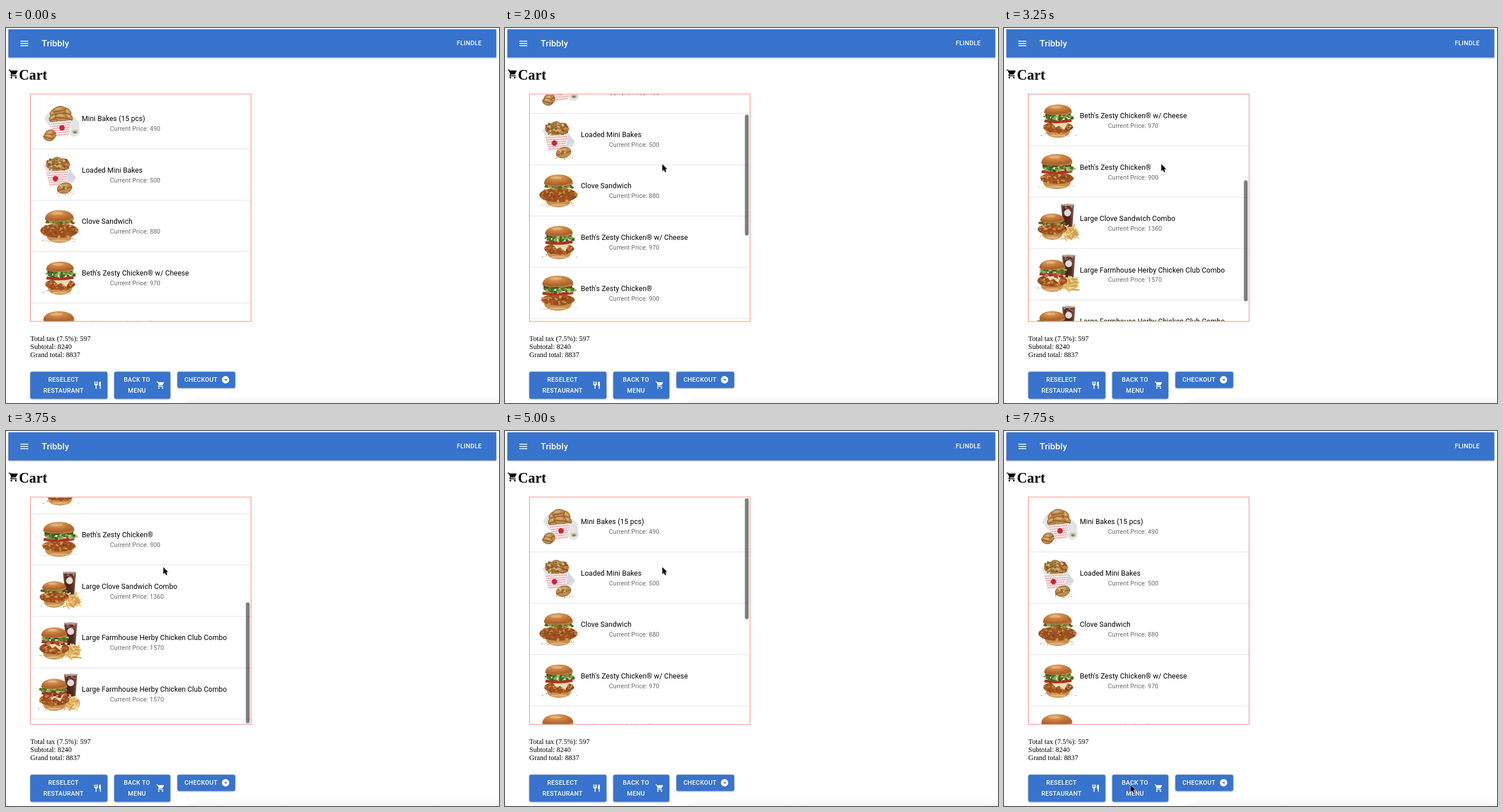
Recreate the animation shown at these times as an HTML page. Size 858 by 653 pixels, loop 8 s.

```html
<!DOCTYPE html>
<html lang="en">
<head>
<meta charset="utf-8">
<title>Cart</title>
<style>
@property --s { syntax: "<number>"; inherits: true; initial-value: 0; }
html, body { margin: 0; width: 100%; height: 100%; overflow: hidden; background: #fff; }
svg { display: block; }
text { font-family: Roboto, sans-serif; }
.raised { fill: #3873cd; filter: drop-shadow(0 1.4px 1.2px rgba(0,0,0,.3)) drop-shadow(0 .5px 1.5px rgba(0,0,0,.14)); }
.serif text { font: 12.3px "Liberation Serif", serif; }
.serif .h1 { font-size: 24.6px; font-weight: 700; }
.logo { font-size: 15.4px; font-weight: 500; letter-spacing: .0075em; fill: #fff; }
.cap { font-size: 10.75px; font-weight: 500; letter-spacing: .02857em; fill: #fff; }
.mid { text-anchor: middle; }
.name { font-size: 12.3px; letter-spacing: .00938em; }
.price { font-size: 10.75px; letter-spacing: .01071em; fill: #686868; }

#view { animation: scroll 8s step-end infinite; }
#list { transform: translateY(calc(var(--s) * -1px)); }
#thumb { transform: translateY(calc(var(--s) * .541px)); animation: thumb 8s step-end infinite; }
#cursor { animation: move 8s step-end infinite; }
@keyframes scroll {
  0% { --s: 0; } 21.875% { --s: 12; } 25% { --s: 62; } 28.125% { --s: 112; }
  31.25% { --s: 146.3; } 37.5% { --s: 212; } 40.625% { --s: 273.6; } 46.875% { --s: 335; }
  56.25% { --s: 241; } 59.375% { --s: 85; } 62.5%, 100% { --s: 0; }
}
@keyframes thumb {
  0% { opacity: 0; } 21.875% { opacity: 1; } 68.75% { opacity: .5; } 71.875%, 100% { opacity: 0; }
}
@keyframes move {
  0% { transform: translate(-40px, 0); }
  9.375% { transform: translate(512px, 133px); }
  12.5% { transform: translate(462px, 175px); }
  15.625% { transform: translate(274.5px, 237px); }
  18.75% { transform: translate(273.7px, 237px); }
  71.875% { transform: translate(274.5px, 239px); }
  75% { transform: translate(265.7px, 448px); }
  81.25% { transform: translate(239px, 558px); }
  84.375%, 100% { transform: translate(220.2px, 616.5px); }
}
</style>
</head>
<body>
<svg width="858" height="653" viewBox="0 0 858 653">
  <defs>
    <clipPath id="frame"><rect x="43" y="116" width="383" height="394.5"/></clipPath>
    <radialGradient id="bun" cx=".42" cy=".2" r=".85">
      <stop offset="0" stop-color="#dfa263"/><stop offset=".45" stop-color="#c47c3c"/>
      <stop offset=".8" stop-color="#a96029"/><stop offset="1" stop-color="#c98d4e"/>
    </radialGradient>
    <linearGradient id="cola">
      <stop offset="0" stop-color="#8d6a5f"/><stop offset=".25" stop-color="#4b2219"/>
      <stop offset=".7" stop-color="#54291f"/><stop offset="1" stop-color="#90695c"/>
    </linearGradient>
    <linearGradient id="haze" x2="0" y2="1">
      <stop offset="0" stop-color="#fff"/><stop offset="1" stop-color="#f6f6f6"/>
    </linearGradient>
    <path id="cart" d="M7 18c-1.1 0-2 .9-2 2s.9 2 2 2 2-.9 2-2-.9-2-2-2zM1 2v2h2l3.6 7.6-1.35 2.45c-.16.28-.25.61-.25.95 0 1.1.9 2 2 2h12v-2H7.42c-.14 0-.25-.11-.25-.25l.03-.12.9-1.63h7.45c.75 0 1.41-.41 1.75-1.03l3.58-6.49c.6-1-.1-1.48-.88-1.48H5.21l-.94-2H1zm16 16c-1.1 0-2 .9-2 2s.9 2 2 2 2-.9 2-2-.9-2-2-2z"/>
    <path id="arrow" d="M0 0V13.2L3 10.5 5 15.2 7.4 14.2 5.4 9.6H9.4Z"/>
  </defs>

  <path d="M310 653L350 638H858V653Z" fill="url(#haze)"/>
  <g class="raised">
    <rect x="4.2" y="2.3" width="849" height="48.9"/>
    <rect x="42.3" y="598.6" width="134.2" height="46.8" rx="3"/>
    <rect x="188.4" y="598.6" width="97.6" height="46.8" rx="3"/>
    <rect x="298.3" y="598.6" width="100.6" height="28.2" rx="3"/>
  </g>

  <path d="M25 23.1h13.8M25 26.9h13.8M25 30.7h13.8" stroke="#fff" stroke-width="1.5"/>
  <text class="logo" x="62" y="32">Tribbly</text>
  <text class="cap" x="784.5" y="30.3">FLINDLE</text>

  <use href="#cart" transform="translate(4 71) scale(.768)"/>
  <g class="serif">
    <text class="h1" x="22.6" y="89.5">Cart</text>
    <text x="42.3" y="545">Total tax (7.5%): 597</text>
    <text x="42.3" y="559">Subtotal: 8240</text>
    <text x="42.3" y="573">Grand total: 8837</text>
  </g>

  <g id="view" clip-path="url(#frame)">
    <g id="list"></g>
    <rect id="thumb" x="417.5" y="117.3" width="6.6" height="210.5" rx="3.3" fill="#000" fill-opacity=".51"/>
  </g>
  <rect x="42.5" y="115" width="384" height="396" fill="none" stroke="#f5857d"/>

  <g class="cap mid">
    <text x="100" y="616.3">RESELECT</text>
    <text x="100" y="635">RESTAURANT</text>
    <text x="228" y="616.3">BACK TO</text>
    <text x="228" y="635">MENU</text>
    <text x="339.3" y="616.3">CHECKOUT</text>
  </g>
  <path fill="#fff" transform="translate(151.6 614.2) scale(.64)" d="M11 9H9V2H7v7H5V2H3v7c0 2.12 1.66 3.84 3.75 3.97V22h2.5v-9.03C11.34 12.84 13 11.12 13 9V2h-2v7zm5-3v8h2.5v8H21V2c-2.76 0-5 2.24-5 4z"/>
  <use href="#cart" fill="#fff" transform="translate(261.5 614.2) scale(.64)"/>
  <circle cx="382.1" cy="612.5" r="6.4" fill="#fff"/>
  <path d="M379.5 611.9h2.6v-2l2.7 2.6-2.7 2.6v-2h-2.6z" fill="#3873cd"/>

  <g id="cursor">
    <g transform="scale(.92)">
      <use href="#arrow" x="1" y="1.4" opacity=".2"/>
      <use href="#arrow" stroke="#fff" stroke-width="1.4" paint-order="stroke"/>
    </g>
  </g>
</svg>
<script>
let seed = 7;
const rnd = () => (seed = seed * 16807 % 2147483647) / 2147483647;
const oval = (x, y, rx, ry, fill, more = '') =>
  `<ellipse cx="${x}" cy="${y}" rx="${rx}" ry="${ry}" fill="${fill}" ${more}/>`;
const path = (d, fill, more = '') => `<path d="${d}" fill="${fill}" ${more}/>`;

// Random spots inside an ellipse
function spots(n, cx, cy, rx, ry, size, colors) {
  let out = '';
  for (let i = 0; i < n; i++) {
    const a = rnd() * 6.283, d = Math.sqrt(rnd());
    const r = size * (.6 + rnd() * .6);
    out += oval((cx + Math.cos(a) * d * rx).toFixed(1), (cy + Math.sin(a) * d * ry).toFixed(1),
      r.toFixed(1), (r * .75).toFixed(1), colors[i % colors.length]);
  }
  return out;
}

const CRUST = ['#a4551f', '#c47a38', '#86431a', '#b4652a', '#d49a58'];
const GREEN = ['#587f2c', '#83a64c', '#3c621c', '#a5bf6c', '#4c7424'];
const PICKLE = ['#76822f', '#98a04a', '#5c6a22'];
const BACON = ['#b04430', '#cc7058', '#8f2f22'];

const crumbs = (cx, y, w) => spots(16, cx, y, w, 4, 1, ['#c98a4e', '#e0b98a', '#8fa65a']);

function burger({ cx, w, top, mid, base, bunH, pickle, tomato, cheese, bacon, wide = 1.15 }) {
  const h = w / 2, l = cx - h, r = cx + h, cy = (mid + base) / 2, b = top + bunH;
  let g = crumbs(cx, base + 5, h * 1.35);
  g += path(`M${l + 3} ${base - 4}H${r - 3}Q${r - 2} ${base + 9} ${cx} ${base + 10}Q${l + 2} ${base + 9} ${l + 3} ${base - 4}`, '#cb8f4c');
  g += oval(cx, base + 6, h * .6, 2, '#dfb07a');
  g += oval(cx, cy, h * wide - 1, (base - mid) / 2 + 1, '#98501f');
  g += spots(75, cx, cy, h * wide - 2, (base - mid) / 2 + 1, 2.3, CRUST);
  if (cheese) g += path(`M${cx - h * .5} ${mid}L${cx + h * .75} ${mid}L${cx + h * .45} ${mid + 13}L${cx + 2} ${mid + 6}L${cx - 4} ${mid + 9}Z`, '#eedcb2');
  if (tomato) g += path(`M${l + 1} ${mid - 5}Q${cx} ${mid - 2} ${r - 1} ${mid - 6}L${r} ${mid - 1}Q${cx} ${mid + 4} ${l} ${mid}Z`, '#b92c20');
  if (bacon) g += spots(18, cx, mid + 1, h, 4, 2.8, BACON);
  g += path(`M${l + 2} ${b - 4}H${r - 2}V${b + 3}H${l + 2}Z`, '#4f4a1c');
  g += pickle ? spots(22, cx, mid - 2, h * 1.04, 2.5, 2.8, PICKLE)
    : spots(48, cx, mid - 8, h * 1.1, 5, 3, GREEN);
  g += path(`M${l} ${b - 4}C${l} ${top + 4} ${cx - h * .5} ${top} ${cx} ${top}S${r} ${top + 4} ${r} ${b - 4}Q${r - 2} ${b} ${cx} ${b}T${l} ${b - 4}`, 'url(#bun)');
  return g + oval(cx - h * .15, top + bunH * .27, h * .4, bunH * .12, '#efc794', 'opacity=".5"');
}

const cup = (x, y) =>
  path(`M${x} ${y}H${x + 23}L${x + 20} ${y + 39}H${x + 4}Z`, 'url(#cola)') +
  oval(x + 11.5, y + 1, 11.5, 2, '#b9a198') +
  spots(14, x + 11.5, y + 6, 9, 4, 2, ['#8e6759', '#6a3f32', '#a98b80']) +
  `<circle cx="${x + 11.5}" cy="${y + 15}" r="6" fill="#e4dad7"/>`;

function fries() {
  let g = oval(61, 56, 13, 11, '#dfb264');
  for (let i = 0; i < 32; i++) {
    const x = 46 + rnd() * 25, y = 45 + rnd() * 21, a = rnd() * 3.14;
    const dx = Math.cos(a) * 7, dy = Math.sin(a) * 6;
    g += `<path d="M${x - dx * .8} ${y - dy}L${Math.min(77, x + dx)} ${y + dy}" stroke="${['#e6bd70', '#f3dba2', '#cf9a4c'][i % 3]}" stroke-width="2.2"/>`;
  }
  return g;
}

const taco = (x, y, rx, ry, turn) =>
  `<g transform="rotate(${turn} ${x} ${y})">` + oval(x, y, rx, ry, '#c08a4c', 'stroke="#8a5a2a" stroke-width=".9"') +
  path(`M${x - rx} ${y + 1}Q${x} ${y + ry * .2} ${x + rx} ${y + 1}`, 'none', 'stroke="#7d4a1d" stroke-width="1.2"') +
  oval(x - 1, y - ry * .45, rx * .55, ry * .25, '#d7ab6f') + '</g>';

// Carton with a dotted red print
const box = (d, lines, x, y) =>
  path(d, '#f8ecec') + path(lines, 'none', 'stroke="#d9747a" stroke-width="1.5" stroke-dasharray="1.6 1.3"') +
  `<circle cx="${x}" cy="${y}" r="4.8" fill="#cf2430"/>`;

const tacos = () =>
  path('M11 31L19 18 31 23 60 24 72 36 73 53 62 57 55 42 22 45Z', '#e1e3e7') +
  taco(31, 21, 10, 8, -35) + taco(49, 20, 10, 8, 35) + taco(38, 16, 11, 7, -10) +
  taco(29, 30, 9, 7, -20) + taco(52, 29, 9, 7, 20) + taco(41, 28, 11, 7, 4) +
  box('M22 37L59 33 55 60 28 64Z', 'M24 40L57 37M25 44L57 41M26 48L56 45M27 52L55 49M28 56L55 53M29 60L54 57', 42.5, 46.5) +
  taco(22, 59, 10, 9, -30) + taco(19, 63, 9, 6, 15) +
  oval(64, 54, 9, 8, '#e3e6e5') + oval(65, 53, 6, 4, '#c9d0a8') + oval(65, 54, 3, 2, '#7b8a55');

const loaded = () =>
  path('M10 23L20 15 55 27 67 44 62 52 48 55 20 42Z', '#e0e2e6') +
  taco(24, 20, 9, 8, -30) + taco(46, 20, 10, 9, 40) + taco(34, 15, 9, 7, 0) + taco(36, 27, 12, 8, 10) +
  spots(60, 35, 21, 21, 13, 2.1, ['#b87232', '#667f36', '#dcb878', '#8f5024', '#a9502c']) +
  box('M14 33L55 31 50 57 21 60Z', 'M16 36L53 34M17 40L53 38M18 44L52 42M19 48L51 46M20 52L51 50M21 56L50 54', 31, 45.5) +
  path('M55 31L67 44 52 51Z', '#d5d8dc') +
  crumbs(48, 70, 18) + taco(47, 62, 13, 9, -15) +
  spots(9, 44, 59, 9, 4, 1.9, ['#6f8b39', '#a55e2b', '#e3c788']);

const cluck = () => burger({ cx: 38, w: 50, top: 11, bunH: 20, mid: 35, base: 58, pickle: 1, wide: 1.37 });
const cheesy = () => burger({ cx: 39, w: 48, top: 11, bunH: 18, mid: 42, base: 59, tomato: 1, cheese: 1, wide: 1.12 });
const spicy = () => burger({ cx: 37, w: 54, top: 8, bunH: 20, mid: 41, base: 59, tomato: 1, wide: 1.1 });
const combo = () => cup(44, 6) + fries() +
  burger({ cx: 29, w: 42, top: 22, bunH: 16, mid: 41, base: 58, pickle: 1, wide: 1.26 });
const club = () => cup(46, 5) + fries() +
  burger({ cx: 29, w: 45, top: 13, bunH: 18, mid: 40, base: 59, tomato: 1, bacon: 1, cheese: 1, wide: 1.2 });

const items = [
  ['Mini Bakes (15 pcs)', 490, tacos],
  ['Loaded Mini Bakes', 500, loaded],
  ['Clove Sandwich', 880, cluck],
  ['Beth\'s Zesty Chicken® w/ Cheese', 970, cheesy],
  ['Beth\'s Zesty Chicken®', 900, spicy],
  ['Large Clove Sandwich Combo', 1360, combo],
  ['Large Farmhouse Herby Chicken Club Combo', 1570, club],
  ['Large Farmhouse Herby Chicken Club Combo', 1570, club]
];
const ROW = 89.45;
document.getElementById('list').innerHTML = items.map(([name, price, draw], i) =>
  `<g transform="translate(0 ${121.2 + i * ROW})">
    <g transform="translate(55 6.2)">${draw()}</g>
    <text class="name" x="132" y="41.3">${name}</text>
    <text class="price" x="181" y="58.2">Current Price: ${price}</text>
    <path d="M43 ${ROW}H426" stroke="#e2e2e2"/>
  </g>`).join('');
</script>
</body>
</html>
```
